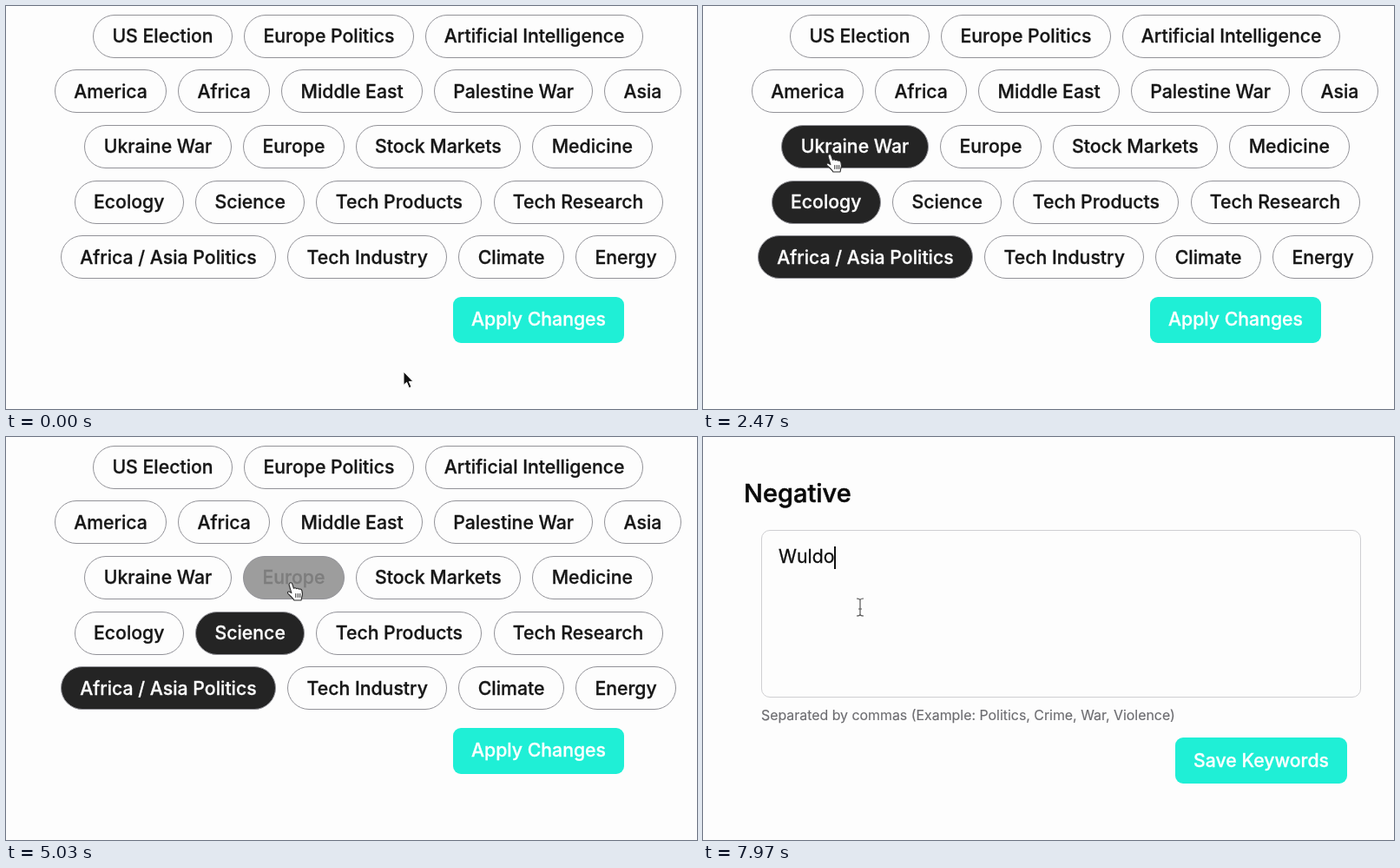
An HTML page for the animation above (8 s loop, 796 by 464 pixels).

```html
<!DOCTYPE html>
<html lang="en">
<head>
<meta charset="utf-8">
<title>Topic picker</title>
<style>
  html, body { margin: 0; width: 100%; height: 100%; overflow: hidden; }
  body {
    position: relative;
    background: #fdfdfd;
    color: #161616;
    font: 500 21.25px/1.2 Inter, sans-serif;
    -webkit-text-stroke: .3px;
    white-space: nowrap;
  }
  .view { position: absolute; left: 0; top: 0; width: 796px; height: 464px; overflow: hidden; }
  .row { position: absolute; display: flex; gap: 13.2px; }
  .chip, .button {
    box-sizing: border-box;
    display: flex;
    align-items: center;
    justify-content: center;
  }
  .chip { flex: none; height: 50px; border: 1px solid #929298; border-radius: 25px; }
  .button {
    position: absolute;
    height: 53px;
    border-radius: 9px;
    background: #1fefd6;
    color: #fff;
  }
  #apply { left: 515px; top: 334.5px; width: 197px; }
  #save { left: 544px; top: 346px; width: 198px; }
  h1 { position: absolute; left: 47px; top: 48px; margin: 0; font-size: 29px; font-weight: 500; color: #0a0a0a; -webkit-text-stroke-width: .5px; }
  .field {
    position: absolute;
    left: 67px; top: 107px;
    box-sizing: border-box;
    width: 691px; height: 193px;
    padding: 17px 19px;
    border: 1px solid #cfcfd2;
    border-radius: 10px;
    font-weight: 400;
    color: #0f0f0f;
  }
  #caret { display: inline-block; width: 1.4px; height: 26px; background: #111; vertical-align: middle; }
  .hint { position: absolute; left: 67px; top: 311px; font-size: 15.9px; font-weight: 400; color: #6c6c70; -webkit-text-stroke-width: .15px; }
  #cursors { pointer-events: none; }
</style>
</head>
<body>
<div class="view" id="topics">
  <div class="button" id="apply">Apply Changes</div>
</div>
<div class="view" id="keywords">
  <h1>Negative</h1>
  <div class="field"><span id="typed"></span><span id="caret"></span></div>
  <div class="hint">Separated by commas (Example: Politics, Crime, War, Violence)</div>
  <div class="button" id="save">Save Keywords</div>
</div>
<svg class="view" id="cursors" viewBox="0 0 796 464">
  <g id="arrow">
    <path d="M0 0V15.5L3.6 12.3L6.3 18.8L9 17.6L6.3 11.4H11Z" fill="#111" stroke="#fff" stroke-width="1"/>
  </g>
  <g id="hand">
    <g transform="translate(-4.5 -1)" stroke="#2c2c2c" stroke-linecap="round" stroke-linejoin="round">
      <path fill="#fdfdfd" stroke-width="1.1" d="M3 1.5C4 .2 5.7 .6 6.2 2L8 7.2C9 6.4 10.3 6.7 11 7.6C12 6.9 13.4 7.2 14 8.2C15.4 7.6 17 8.4 17.4 10C18.2 13 18.6 15 17.2 17.4L16.6 21H8.4C7 18.5 4 16 1.4 13.4C.2 12 1.6 10.4 3.2 11.2L5.4 12.6L2.8 4C2.4 3 2.4 2.2 3 1.5Z"/>
      <path fill="none" stroke-width="1" d="M10.3 13.5v4M12.8 13.5v4M15.2 13.5v4"/>
    </g>
  </g>
  <g id="beam" fill="none" stroke="#555" stroke-width="1.2">
    <path d="M-4 -10C-2 -10 0 -9.5 0 -8C0 -9.5 2 -10 4 -10M0 -8V8M-4 10C-2 10 0 9.5 0 8C0 9.5 2 10 4 10M-2 2H2"/>
  </g>
</svg>
<script>
const LOOP = 8000, FADE = 150, CUT = 6850;
const $ = id => document.getElementById(id);

// Each row: left edge, then label and pill width.
const rows = [
  [100, ['US Election', 161], ['Europe Politics', 195.5], ['Artificial Intelligence', 251.5]],
  [56, ['America', 129], ['Africa', 106], ['Middle East', 162.5], ['Palestine War', 183], ['Asia', 88.5]],
  [90, ['Ukraine War', 170], ['Europe', 116.5], ['Stock Markets', 190], ['Medicine', 138.5]],
  [78.5, ['Ecology', 126.5], ['Science', 126], ['Tech Products', 191], ['Tech Research', 195]],
  [63, ['Africa / Asia Politics', 248], ['Tech Industry', 184], ['Climate', 121.5], ['Energy', 116]]
];

// Click times; each click toggles the pill.
const clicks = {
  'Africa / Asia Politics': [900],
  'Ecology': [1520, 4220],
  'Ukraine War': [2320, 2800],
  'Science': [3700],
  'Europe': [4962, 5450],
  'Africa': [6300]
};

// Pointer stops: time, x, y.
const stops = [
  [30, 458, 421], [820, 196, 288], [1020, 192, 285], [1230, 163, 243],
  [1430, 150, 226], [1700, 150, 226], [2150, 145, 173], [2470, 146, 171],
  [2900, 146, 171], [3330, 245, 222], [3570, 259, 220], [3830, 259, 221],
  [4130, 160, 228], [4370, 158, 228], [4850, 326, 168], [5030, 328, 168],
  [5550, 328, 168], [5970, 249, 133], [6180, 240, 104], [CUT, 240, 104]
];

const word = 'Wuldo';
const keyTimes = [7300, 7450, 7590, 7720, 7860];

const chips = [];
rows.forEach(([left, ...items], i) => {
  const row = document.createElement('div');
  row.className = 'row';
  row.style.left = left + 'px';
  row.style.top = 9.7 + i * 63.67 + 'px';
  for (const [label, width] of items) {
    const chip = document.createElement('div');
    chip.className = 'chip';
    chip.textContent = label;
    chip.style.width = width + 'px';
    row.append(chip);
    if (clicks[label]) chips.push({ chip, times: clicks[label] });
  }
  $('topics').append(row);
});

const clamp = v => Math.min(1, Math.max(0, v));
const ease = v => v * v * (3 - 2 * v);
const mix = (a, b, k) => a + (b - a) * k;
const gray = v => `rgb(${v}, ${v}, ${v})`;
const show = (el, on) => { el.style.visibility = on ? 'visible' : 'hidden'; };

// Gray levels of the pill in its two states.
const PAPER = 253, INK = 22, FILL = 36, LIGHT = 255;

function selected(times, t) {
  return times.reduce((sum, at, i) => sum + (i % 2 ? -1 : 1) * ease(clamp((t - at) / FADE)), 0);
}

function pointer(t) {
  const next = stops.findIndex(s => s[0] > t);
  if (next === 0) return stops[0].slice(1);
  if (next < 0) return [181, 196];
  const [t0, x0, y0] = stops[next - 1], [t1, x1, y1] = stops[next];
  const k = ease((t - t0) / (t1 - t0));
  return [mix(x0, x1, k), mix(y0, y1, k)];
}

function render(t) {
  const writing = t >= CUT;
  show($('topics'), !writing);
  show($('keywords'), writing);

  for (const { chip, times } of chips) {
    const k = selected(times, t);
    chip.style.backgroundColor = gray(mix(PAPER, FILL, k));
    chip.style.color = gray(mix(INK, LIGHT, k));
  }

  const [x, y] = pointer(t);
  const active = writing ? 'beam' : x < 311 && y < 314 || t > 800 ? 'hand' : 'arrow';
  for (const id of ['arrow', 'hand', 'beam']) show($(id), id === active);
  $(active).setAttribute('transform', `translate(${x} ${y})`);

  $('typed').textContent = word.slice(0, keyTimes.filter(at => at <= t).length);
  show($('caret'), t >= CUT + 200);
}

function frame() {
  render(performance.now() % LOOP);
  requestAnimationFrame(frame);
}
frame();
</script>
</body>
</html>
```
